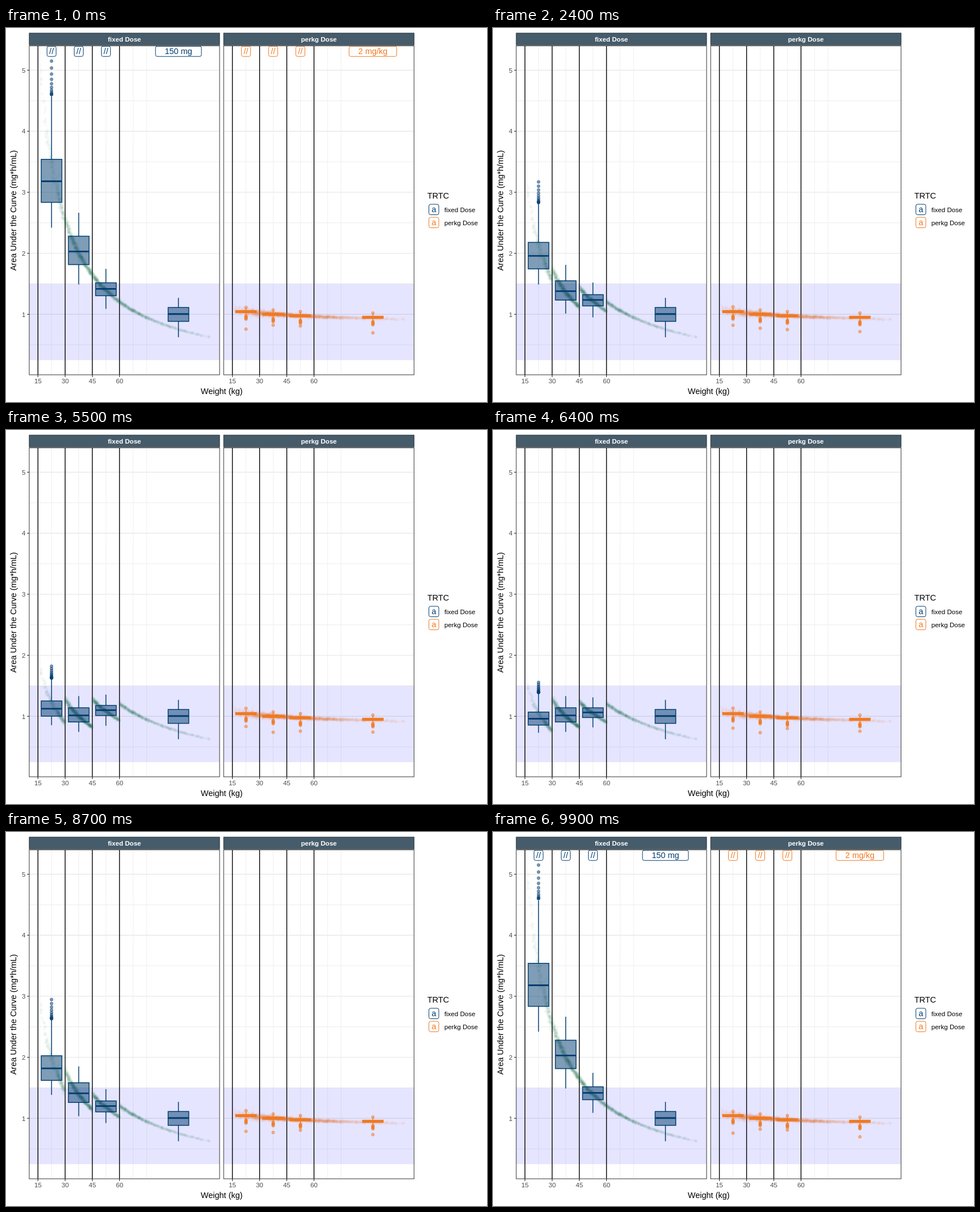
An HTML page with a canvas that plays this animation: 849 by 660 pixels, repeating every 10000 ms.

```html
<!DOCTYPE html>
<html lang="en">
<head>
<meta charset="utf-8">
<title>Dose and exposure by weight</title>
<style>
  html, body { margin: 0; width: 100%; height: 100%; overflow: hidden; background: #fff; }
  canvas { display: block; }
</style>
</head>
<body>
<canvas id="stage" width="849" height="660"></canvas>
<script>
const ctx = document.getElementById('stage').getContext('2d');
const NAVY = '#003c6e', ORANGE = '#f07820', GREEN = '#1a6b5a';
const FONT = '"Liberation Sans", Arial, sans-serif';
const TOP = 32, BOTTOM = 612, WIDTH = 336;
const LEFTS = [41, 384.2];
const CENTERS = [22.5, 37.5, 52.5, 92.5];
const BREAKS = [15, 30, 45, 60];

const xOf = (panel, weight) => LEFTS[panel] + 15.4 + (weight - 15) * 3.2;
const yOf = value => 613 - value * 107.7;
const mix = (a, b, u) => a + (b - a) * u;
const range = (n, fn) => Array.from({ length: n }, (_, i) => fn(i));

// Dose labels of the three lower weight groups in each state; '//' keeps the full dose
const STATES = [['//', '//', '//'], ['x0.4', 'x0.5', 'x0.80'], ['x0.30', 'x0.5', 'x0.75']];
const factorOf = label => label === '//' ? 1 : Number(label.slice(1));
const FACTORS = STATES.map(labels => [...labels.map(factorOf), 1]);

// Whisker, quartile, median, quartile, whisker at the full fixed dose
const FIXED_BOXES = [
  [2.42, 2.835, 3.18, 3.54, 4.57],
  [1.49, 1.815, 2.03, 2.28, 2.665],
  [1.09, 1.305, 1.418, 1.517, 1.745],
  [0.625, 0.885, 1.005, 1.112, 1.27]
];
const FIXED_OUTLIERS = range(11, i => 4.6 + 0.55 * (i / 10) ** 2.2);

let seed = 7;
function random() {
  seed = (seed * 16807) % 2147483647;
  return seed / 2147483647;
}
const normal = () => Math.sqrt(-2 * Math.log(random())) * Math.cos(2 * Math.PI * random());

// Exposure per kg falls slowly with weight
const perkgAt = weight => 0.965 * (weight / 60) ** -0.08;
const PERKG_MEDIANS = CENTERS.map(weight => perkgAt(Math.min(weight, 72)));

// One or two high outliers, a low cluster and a stray point
const perkgOutliers = (median, group) => [
  median + 0.07 + (group ? 0 : 0.03 * random()),
  ...range(5, i => median - 0.07 - 0.013 * i),
  median - 0.13 - 0.17 * random()
];
const PERKG_OUTLIERS = STATES.map(() => PERKG_MEDIANS.map(perkgOutliers));

// Simulated subjects with log-normal weights
const subjects = [];
while (subjects.length < 2400) {
  const weight = 46 * Math.exp(0.42 * normal());
  if (weight < 15.5 || weight > 110) continue;
  const perkg = perkgAt(weight) * (1 + normal() / (weight + 10));
  subjects.push({ weight, perkg, group: Math.min(3, Math.floor(weight / 15) - 1) });
}

function line(x1, y1, x2, y2, color, width) {
  ctx.strokeStyle = color;
  ctx.lineWidth = width;
  ctx.beginPath();
  ctx.moveTo(x1, y1);
  ctx.lineTo(x2, y2);
  ctx.stroke();
}

function text(str, x, y, size, color, align = 'center', weight = '') {
  ctx.font = `${weight} ${size}px ${FONT}`;
  ctx.fillStyle = color;
  ctx.textAlign = align;
  ctx.fillText(str, x, y);
}

function disc(x, y, r) {
  ctx.beginPath();
  ctx.arc(x, y, r, 0, 2 * Math.PI);
  ctx.fill();
}

function tag(str, x, y, width, height, color) {
  ctx.beginPath();
  ctx.roundRect(x - width / 2, y - height / 2, width, height, 3);
  ctx.fillStyle = '#fff';
  ctx.fill();
  ctx.strokeStyle = color;
  ctx.lineWidth = 1;
  ctx.stroke();
  text(str, x, y + 5, 14.5, color);
}

function drawPanelBack(panel) {
  const left = LEFTS[panel];
  for (let v = 0.5; v < 5.4; v += 0.5)
    line(left, yOf(v), left + WIDTH, yOf(v), '#e9e9e9', v % 1 ? 0.8 : 1.4);
  for (const w of [22.5, 37.5, 52.5, 67.5, 75])
    line(xOf(panel, w), TOP, xOf(panel, w), BOTTOM, '#ebebeb', 0.8);
  ctx.fillStyle = 'rgba(0,0,255,0.1)';
  ctx.fillRect(left, yOf(1.5), WIDTH, yOf(0.25) - yOf(1.5));
  for (const w of BREAKS)
    line(xOf(panel, w), TOP, xOf(panel, w), BOTTOM, '#000', 1.4);
}

function drawPanelFrame(panel) {
  const left = LEFTS[panel];
  ctx.strokeStyle = '#333';
  ctx.lineWidth = 1;
  ctx.strokeRect(left, TOP - 0.5, WIDTH, BOTTOM - TOP + 0.5);
  ctx.fillStyle = '#465c6b';
  ctx.fillRect(left, 9, WIDTH, 21);
  ctx.strokeStyle = '#22303a';
  ctx.strokeRect(left, 9, WIDTH, 21);
  text(['fixed Dose', 'perkg Dose'][panel], left + WIDTH / 2, 23.7, 11.6, '#fff', 'center', 'bold');
  for (const w of BREAKS) {
    line(xOf(panel, w), BOTTOM, xOf(panel, w), BOTTOM + 4, '#333', 1.2);
    text(w, xOf(panel, w), 627, 11.6, '#4d4d4d');
  }
}

function drawScatter(panel, factors) {
  ctx.fillStyle = panel ? ORANGE : GREEN;
  ctx.globalAlpha = 0.022;
  for (const { weight, perkg, group } of subjects) {
    const value = panel ? perkg : perkg * 75 / weight * factors[group];
    disc(xOf(panel, weight), yOf(value), 2.5);
  }
  ctx.globalAlpha = 1;
}

function drawBox(x, [low, q1, median, q3, high], outliers, color) {
  ctx.fillStyle = ctx.strokeStyle = color;
  ctx.lineWidth = 1;
  ctx.globalAlpha = 0.5;
  for (const value of outliers) {
    disc(x, yOf(value), 2.6);
    ctx.stroke();
  }
  const box = [x - 18.2, yOf(q3), 36.4, yOf(q1) - yOf(q3)];
  ctx.fillRect(...box);
  ctx.globalAlpha = 1;
  line(x, yOf(high), x, yOf(q3), color, 1.5);
  line(x, yOf(q1), x, yOf(low), color, 1.5);
  ctx.strokeRect(...box);
  line(x - 18.2, yOf(median), x + 18.2, yOf(median), color, 2.8);
}

function drawAxesAndLegend() {
  for (let v = 1; v <= 5; v++) {
    line(37.3, yOf(v), 41, yOf(v), '#333', 1.2);
    text(v, 34.5, yOf(v) + 4.2, 11.6, '#4d4d4d', 'right');
  }
  text('Weight (kg)', 380.7, 646, 14.5, '#000');
  ctx.save();
  ctx.translate(18, 322);
  ctx.rotate(-Math.PI / 2);
  text('Area Under the Curve (mg*h/mL)', 0, 0, 14.5, '#000');
  ctx.restore();
  text('TRTC', 743.7, 301, 14.5, '#000', 'left');
  [['fixed Dose', NAVY], ['perkg Dose', ORANGE]].forEach(([name, color], i) => {
    tag('a', 755.2, 320.3 + 23 * i, 17.5, 18.5, color);
    text(name, 773.7, 325.3 + 23 * i, 11.6, '#000', 'left');
  });
}

function drawLabels(labels) {
  const doseTag = (str, panel, group, width) =>
    tag(str, xOf(panel, CENTERS[group]), 41.2, width, 18, panel ? ORANGE : NAVY);
  labels.forEach((label, g) => {
    doseTag(label, 0, g, label === '//' ? 16 : 4 + 8 * label.length);
    doseTag('//', 1, g, 16);
  });
  doseTag('150 mg', 0, 3, 81);
  doseTag('2 mg/kg', 1, 3, 84);
}

// Last held step and number of 100 ms steps of each transition
const TRANSITIONS = [[11, 22], [45, 21], [78, 21]];

function poseAt(step) {
  let from = 0;
  for (const [start, length] of TRANSITIONS) {
    const k = step - start;
    if (k <= 0) break;
    const to = (from + 1) % 3;
    if (k < length) return { from, to, u: (1 - Math.cos(Math.PI * k / length)) / 2 };
    from = to;
  }
  return { from, to: from, u: 0 };
}

function draw(step) {
  const { from, to, u } = poseAt(step);
  const tween = (a, b) => a.map((value, i) => mix(value, b[i], u));
  const factors = tween(FACTORS[from], FACTORS[to]);

  ctx.fillStyle = '#fff';
  ctx.fillRect(0, 0, 849, 660);
  for (const panel of [0, 1]) {
    drawPanelBack(panel);
    drawScatter(panel, factors);
  }
  CENTERS.forEach((center, g) => {
    const scale = value => value * factors[g];
    drawBox(xOf(0, center), FIXED_BOXES[g].map(scale), g ? [] : FIXED_OUTLIERS.map(scale), NAVY);

    const perkgBox = [-0.06, -0.018, 0, 0.018, 0.06].map(d => PERKG_MEDIANS[g] + d);
    drawBox(xOf(1, center), perkgBox, tween(PERKG_OUTLIERS[from][g], PERKG_OUTLIERS[to][g]), ORANGE);
  });
  if (from === to) drawLabels(STATES[from]);
  drawPanelFrame(0);
  drawPanelFrame(1);
  drawAxesAndLegend();
}

let shown = -1;
function tick() {
  const step = Math.floor(performance.now() % 10000 / 100);
  if (step !== shown) draw(shown = step);
  requestAnimationFrame(tick);
}
tick();
</script>
</body>
</html>
```
